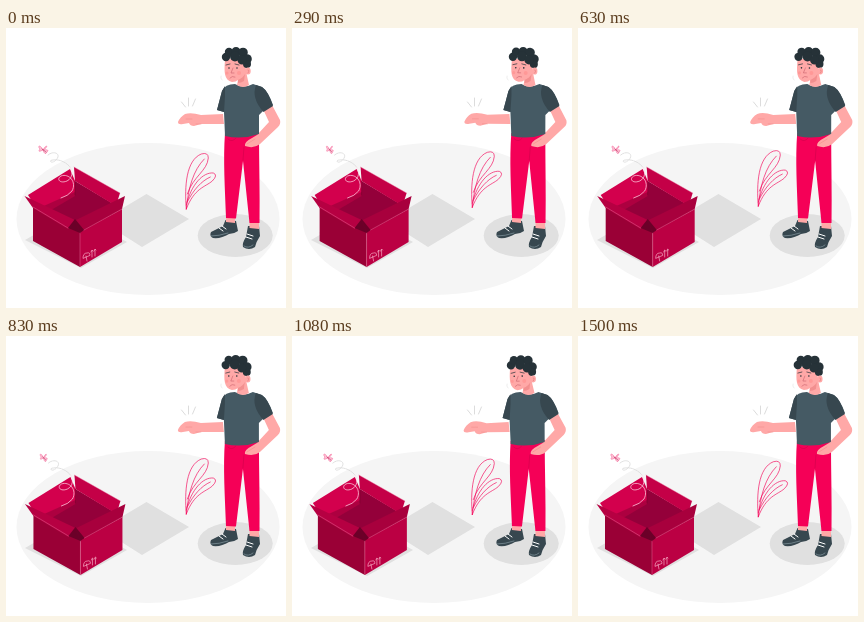
Animation, 280 px wide and 280 px high, one loop 1540 ms. Source, as an HTML page:

```html
<!DOCTYPE html>
<html lang="en">
<head>
<meta charset="utf-8">
<title>Shaking box</title>
<style>
  html, body { margin: 0; height: 100%; overflow: hidden; background: #fff; }
  svg { display: block; width: 100vw; height: 100vh; }
  .line { fill: none; stroke-linecap: round; stroke-linejoin: round; }
</style>
</head>
<body>
<svg viewBox="0 0 280 280">
  <ellipse cx="142" cy="191" rx="131.5" ry="76" fill="#f5f5f5"/>
  <ellipse cx="229.2" cy="207.5" rx="37.5" ry="21.5" fill="#e0e0e0"/>
  <path d="M95 193 140.5 166 183 191 136 219ZM19 212 68 184 121 214 75 240Z" fill="#e0e0e0"/>

  <g id="plant" class="line" stroke="#f50057" stroke-width=".65">
    <path d="M180 181C178 158 180 132 195 126Q202 124 202 130C201 143 187 148 181 166M180 181C182 160 187 142 198 131"/>
    <path d="M180 177C185 156 197 144 207 145Q212 147 206 153C199 159 188 160 180 181M181 174C187 162 195 153 204 149"/>
  </g>

  <g id="box">
    <path d="M27 178 69 153 116 181 74 205Z" fill="#94003a"/>
    <path d="M27 178 69 153V168L40 185Z" fill="#ad0040"/>
    <path d="M22 167 64 141 69 153V164L31 181Z" fill="#d3004d"/>
    <path d="M68 139 114 165 110 178 69 153Z" fill="#c40047"/>
    <path d="M27 177 74 204V239L27 213Z" fill="#9a0036"/>
    <path d="M74 204 116 181V214L74 239Z" fill="#bb0043"/>
    <path d="M18.5 168 69 192 62 201 27 180Z" fill="#b60042"/>
    <path d="M70 192 119 168 116 181 78 202Z" fill="#a8003d"/>
    <path d="M62 200 69 191 78 202 74 205Z" fill="#6b0028"/>
    <g class="line" stroke="#ef7ca6" stroke-width=".5">
      <path d="M78 202 116 181M74 205V238M62 200 27 179M68 139 114 165" opacity=".8"/>
      <path d="M69 192 74 205M69 153V167" stroke="#70002b"/>
    </g>
    <g class="line" stroke="#ffc6d9" stroke-width=".6">
      <path d="M77 230Q77 225 81 225 84 224 84 227ZM80 228 81 233M86 229V223M89 228V222M85 224 86 222 87 223M88 223 89 221 90 222"/>
    </g>
    <g class="line" stroke-width=".7">
      <path d="M42 127C48 122 56 126 50 132 45 137 42 132 47 132 53 131 60 134 64 139" stroke="#d5d5d5" stroke-dasharray="4 1"/>
      <path d="M64 139C67 143 67 150 61 153 54 156 50 151 55 148 63 145 71 154 66 163Q62 168 55 170" stroke="#ffe0eb"/>
    </g>
    <g id="butterfly">
      <path d="M37 122C34 116 31 118 34 121Q31 125 37 122 39 128 41 124 44 121 37 122C43 119 41 115 37 122Z" fill="#ffc4d7" stroke="#f0558c" stroke-width=".5"/>
      <path class="line" d="M36 121 40 124" stroke="#9c1746" stroke-width=".5"/>
    </g>
  </g>

  <path class="line" d="M175.5 74 179.5 79M182.5 70V78M189.5 71 186.5 78" stroke="#dcdcdc" stroke-width="1"/>

  <g id="person">
    <g id="shoes">
      <path d="M219.5 192 230 193 232 203Q228 206 223 206 215 211 207 210 203 208 205 204L217 198Z" fill="#37474f"/>
      <path d="M242 198 253 198 254 208Q250 214 249 219 243 223 237 219 236 215 240 209Z" fill="#37474f"/>
      <path class="line" d="M213 200 217 203M216 198 220 201M240 209 246 211M241 206 247 208" stroke="#fff" stroke-width="1"/>
      <path class="line" d="M205 208Q213 208 222 205M238 218Q242 221 247 217" stroke="#90a4ae" stroke-width=".6"/>
    </g>
    <path d="M220 188H229V195L220 194ZM243.500 192H253V201L243.500 200Z" fill="#ffa8a7"/>
    <path d="M219 105 253 104C253 135 254 165 253.500 195L243.500 195 237 133 230 190.500 220 190C219 160 217 132 219 105Z" fill="#f50057"/>
    <path class="line" d="M237 132 238 119M222 111Q226 115 230 110" stroke="#c80049" stroke-width=".5"/>
    <!-- arms -->
    <path d="M217 86 195 87Q185 84 179 86 174 89 172 94 172 97 177 96L183 95Q184 98 188 98L195 96 218 96Z" fill="#ffa8a7"/>
    <path d="M257 81 266 77 274 92Q275 96 272 99L254 116Q248 121 239 118 238 114 246 110L251 107 263 94Z" fill="#ffa8a7"/>
    <path class="line" d="M180 91 186 91M241 116 249 111M195 96 190 96" stroke="#ee8986" stroke-width=".5"/>
    <!-- shirt -->
    <path d="M229 56Q219 56 216 63L211 82 218 84 219 108Q236 112 253 106L253 87 258 82 267 77Q262 63 256 59L247 56Q237 61 229 56Z" fill="#455a64"/>
    <path d="M219 58 216 63 211 82 218 84 219 68ZM250 57 256 59Q262 63 267 78L257.500 84Q245 70 250 57Z" fill="#37474f"/>
    <g id="head">
      <path d="M219 32C218 44 218 52 226 54Q230 54 232 52L231 57Q237 61 243 57L241 48 238 29Z" fill="#ffa8a7"/>
      <path d="M232 52Q237 50 239 46L238 53Q235 55 232 55Z" fill="#f28f8f"/>
      <g fill="#263238">
        <circle cx="220" cy="29" r="4.200"/><circle cx="223" cy="24" r="4.200"/>
        <circle cx="230" cy="23.500" r="4.500"/><circle cx="237" cy="24.500" r="4.800"/>
        <circle cx="241" cy="31" r="4.800"/><circle cx="241" cy="36" r="4"/>
        <circle cx="229" cy="28.500" r="5"/><circle cx="236" cy="32" r="4.500"/>
        <circle cx="223" cy="40" r=".8"/><circle cx="231" cy="40" r=".8"/>
      </g>
      <ellipse cx="242" cy="43" rx="2.700" ry="3.500" fill="#ffa8a7"/>
      <path class="line" d="M220 37 224 36M229 36 233 37" stroke="#263238" stroke-width=".7"/>
      <path class="line" d="M227 40 225 45 228 45M224 50Q226 47.500 229 49" stroke="#c9606c" stroke-width=".6"/>
      <g fill="#ff8584" opacity=".45"><circle cx="221" cy="45" r="1.600"/><circle cx="233" cy="45" r="2"/></g>
      <path class="line" d="M242 42Q244 42 242 45" stroke="#d96d6f" stroke-width=".5"/>
    </g>
  </g>
  <path class="line" d="M215 48Q214 50 216 52" stroke="#e6e6e6" stroke-width=".7"/>
</svg>
<script>
const LOOP = 1540;
const SHAKE = [0, -1, 2, -4, 4, -4, 4, -4, 2, -1, 0];
const SHAKE_SCALE = 0.3;

const part = id => document.getElementById(id);
const [plant, box, butterfly, person, shoes, head] =
  ["plant", "box", "butterfly", "person", "shoes", "head"].map(part);
const place = (el, transform) => el.setAttribute("transform", transform);
const easeOut = x => 1 - (1 - x) ** 2.3;

function shake(p) {
  const i = Math.min(9, Math.floor(p * 10));
  return SHAKE_SCALE * (SHAKE[i] + (SHAKE[i + 1] - SHAKE[i]) * easeOut(p * 10 - i));
}

function draw() {
  const p = performance.now() % LOOP / LOOP;
  const sway = Math.sin(2 * Math.PI * p);
  const flap = 0.87 + 0.13 * Math.cos(6 * Math.PI * p);

  place(box, `translate(${shake(p)} 0)`);
  place(butterfly, `translate(37 122) scale(${flap} 1) translate(-37 -122)`);
  place(plant, `translate(0.3 ${-3 * Math.sin(Math.PI * p)})`);
  place(person, `rotate(${0.2 * sway} 235 205)`);
  place(shoes, `rotate(${-0.2 * sway} 235 205)`);
  place(head, `rotate(${0.9 * sway} 237 57)`);
  requestAnimationFrame(draw);
}
draw();
</script>
</body>
</html>
```
